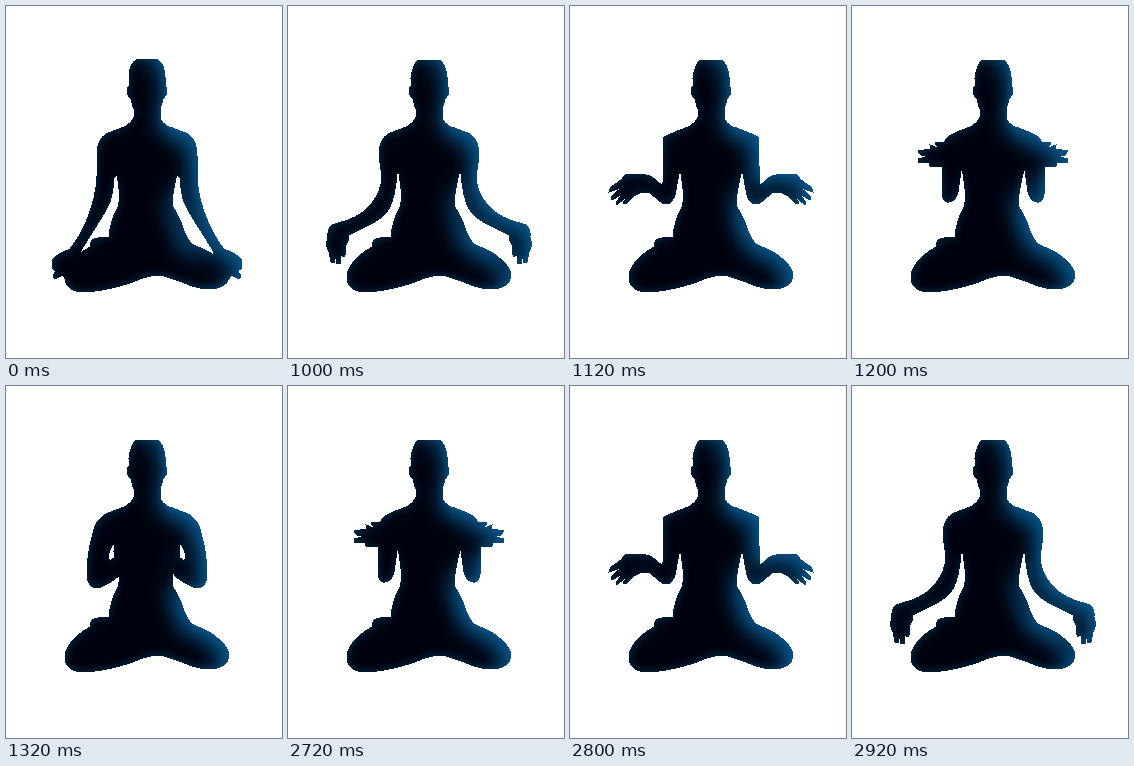
An HTML page for the animation above (3 s loop, 276x352 px).

```html
<!DOCTYPE html>
<html lang="en">
<head>
<meta charset="utf-8">
<title>Meditation</title>
<style>
html, body { margin: 0; width: 100%; height: 100%; overflow: hidden; background: #fff; }
svg { display: block; width: 276px; height: 352px; }
</style>
</head>
<body>
<svg viewBox="0 0 276 352" shape-rendering="crispEdges">
  <defs>
    <g id="figure" fill="#00030f" stroke="#00030f">
      <path id="crown"/>
      <path d="M123 71L123 80L121 82L122 89L125 93Q126 99 128 103V111Q126 117 118 121L105 126L111 168Q115 191 112 201Q104 215 103 231
        Q87 231 85 236L84 241Q61 254 59 270Q58 286 80 286Q109 284 137 272Q147 269 155 269L176 276Q191 283 204 283Q221 282 223 270
        Q223 259 203 246L186 238Q180 232 177 222Q173 210 167 201Q165 192 171 168L177 126L163 121Q155 117 154 111V103Q156 99 157 93
        L160 89L161 82L159 80L159 71Z"/>
      <path id="arm"/>
      <use href="#arm" transform="translate(282) scale(-1 1)"/>
    </g>
    <filter id="rim" filterUnits="userSpaceOnUse" x="0" y="0" width="276" height="352" color-interpolation-filters="sRGB">
      <feGaussianBlur in="SourceAlpha" stdDeviation="4" result="soft"/>
      <feFlood flood-color="#06304e"/>
      <feComposite operator="out" in2="soft" result="edge"/>
      <feMerge result="lit">
        <feMergeNode in="SourceGraphic"/><feMergeNode in="edge"/>
      </feMerge>
      <feComposite in="lit" in2="SourceAlpha" operator="in"/>
    </filter>
    <!-- Light from the upper right -->
    <filter id="side" filterUnits="userSpaceOnUse" x="0" y="0" width="276" height="352" color-interpolation-filters="sRGB">
      <feGaussianBlur in="SourceAlpha" stdDeviation="10"/>
      <feOffset dx="-8" dy="8" result="shade"/>
      <feFlood flood-color="#07568a"/>
      <feComposite operator="out" in2="shade"/>
      <feComposite in2="SourceAlpha" operator="in"/>
    </filter>
    <linearGradient id="fade" gradientUnits="userSpaceOnUse" x1="130" y1="0" x2="165" y2="0">
      <stop stop-color="#fff" stop-opacity=".12"/>
      <stop offset="1" stop-color="#fff"/>
    </linearGradient>
    <mask id="right" maskUnits="userSpaceOnUse" x="0" y="0" width="276" height="352">
      <rect width="276" height="352" fill="url(#fade)"/>
    </mask>
  </defs>
  <use href="#figure" filter="url(#rim)"/>
  <g mask="url(#right)"><use href="#figure" filter="url(#side)"/></g>
</svg>
<script>
const shoulder = 'M118 121L105 126Q91 130 91 150';
const arms = {
  rest: shoulder + `L91 170Q90 193 80 216Q73 232 64 243Q51 248 47 253L46 262L50 265L47 270L49 273L57 269L62 278
    L76 272L74 246L89 222Q99 207 104 196Q107 187 108 172L118 160Z`,
  lift: shoulder + `L94 171Q93 186 84 197Q76 208 60 214L44 219Q39 224 40 231Q37 241 41 246L43 256L46 257L47 248L49 258
    L53 257L52 248L56 251L58 247L57 240Q61 236 61 229L75 222Q94 214 101 203Q107 192 109 168L118 160Z`,
  open: `M118 121L105 126L94 131L93 160V176Q92 181 87 175Q80 168 69 168L55 169L51 174L41 181L39 186L51 182L41 191L42 194
    L54 187L46 196L47 199L58 189L53 197L56 198L64 190Q73 184 80 187L92 197Q101 201 105 189L109 168L118 160Z`,
  turn: `M118 121L105 126L97 130L92 136L83 137L86 142L78 139L79 143L66 145L69 149L77 150L66 153L67 157L77 156L78 160L90 160
    V188Q91 197 97 196Q104 195 106 186L109 165L118 160Z`,
  pray: `M118 121L105 126Q90 131 87 147Q81 167 81 190Q82 202 92 202Q102 199 113 190L118 160L109 157Q107 167 109 171
    L104 175L102 172Q104 159 109 158L118 150Z`
};
const crowns = {
  round: 'M123 72C123 60 128 53 134 53H148C154 53 159 60 159 72Z',
  flat: 'M123 72Q124 62 129 55Q130 54 133 54H150Q153 54 154 56Q159 63 159 72Z'
};
const timeline = [
  [0, 'rest'], [1000, 'lift'], [1120, 'open'], [1200, 'turn'],
  [1320, 'pray'], [2720, 'turn'], [2800, 'open'], [2920, 'lift']
];
const arm = document.getElementById('arm');
const crown = document.getElementById('crown');
const start = performance.now();
let shown;

function draw(now) {
  const t = Math.max(0, now - start) % 3000;
  const pose = timeline.findLast(([at]) => at <= t)[1];
  if (pose !== shown) {
    arm.setAttribute('d', arms[pose]);
    crown.setAttribute('d', pose === 'rest' ? crowns.round : crowns.flat);
    shown = pose;
  }
  requestAnimationFrame(draw);
}
draw(start);
</script>
</body>
</html>
```
